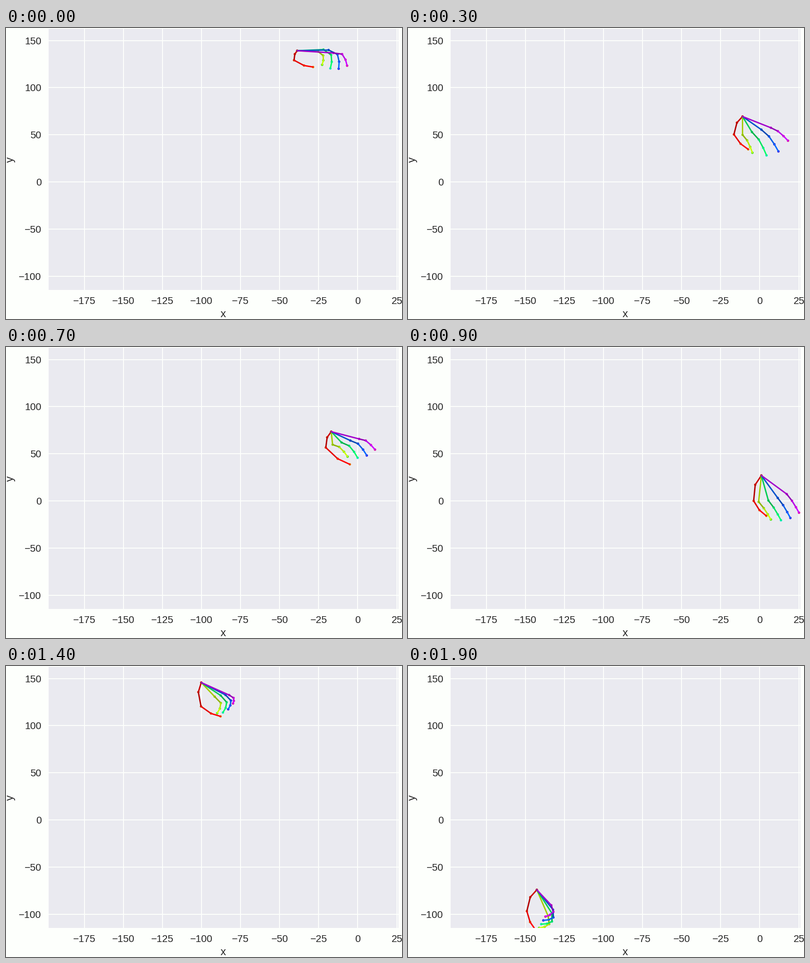
A matplotlib script that plays this animation: 873x641 px, repeating every 2000 ms.

```python
import colorsys

import matplotlib.pyplot as plt
import numpy as np
from matplotlib.animation import FuncAnimation
from matplotlib.collections import LineCollection

W, H, DPI = 873, 641, 144
FRAMES, INTERVAL = 20, 100
LEFT, RIGHT, TOP, BOTTOM = 93.5, 865.5, 2, 577
INK, PAPER, PANEL = "#262626", "#FDFFFC", "#EAEAF0"

plt.rcParams["font.family"] = "Liberation Sans"


def to_data(px):
    """Stage pixels (y down) to axis units."""
    return np.column_stack([(px[:, 0] - 775.5) / 3.4457,
                            (339.2 - px[:, 1]) / 2.0775])


def along(a, b, u, bow=0):
    """Point at fraction u from a to b, pushed sideways by bow * length."""
    v = b - a
    return a + v * u + bow * np.array([-v[1], v[0]])


def hand(wrist, thumb, knuckles, tips, curl, knuckle_bow=0, tip_bow=0):
    """Rig a hand: the four fingers fan out between index and little finger.

    thumb holds its base and tip; knuckles and tips hold the index and
    little finger ends; curl bends each finger outward.
    """
    wrist = np.array(wrist, float)
    (base, end), (k0, k1), (t0, t1) = np.array([thumb, knuckles, tips], float)
    points = [wrist, along(wrist, base, 0.4, 0.12), base,
              along(base, end, 0.55, 0.08), end]
    for u in np.linspace(0, 1, 4):
        arch = 4 * u * (1 - u)
        knuckle = along(k0, k1, u, knuckle_bow * arch)
        tip = along(t0, t1, u, tip_bow * arch)
        points += [knuckle, along(knuckle, tip, 0.38, -curl),
                   along(knuckle, tip, 0.72, -0.65 * curl), tip]
    return np.array(points)


raised = hand((642, 50), [(635, 71), (677, 86)], [(688, 52), (722, 55)],
              [(697, 81), (752, 83)], 0.27, -0.18, 0.15)
lowered = hand((765, 230), [(742, 278), (758, 308)], [(761, 284), (826, 266)],
               [(777, 332), (862, 302)], 0.03, 0, 0.22)
tilted = hand((655, 90), [(648, 104), (726, 145)], [(667, 89), (722, 81)],
              [(706, 103), (765, 87)], 0.23, -0.08, 0.17)
dropped = hand((779, 283), [(762, 339), (790, 372)], [(773, 341), (835, 324)],
               [(800, 380), (862, 365)], 0.03, 0.05, 0.12)
spread = hand((703, 120), [(692, 177), (763, 180)], [(711, 132), (775, 128)],
              [(742, 155), (808, 131)], 0.22, -0.05, 0.2)
across = hand((158, 133), [(168, 181), (183, 222)], [(209, 183), (209, 180)],
              [(189, 233), (193, 214)], 0.36, 2, -0.13)
resting = hand((284, 493), [(262, 540), (281, 581)], [(309, 551), (316, 527)],
               [(289, 577), (303, 552)], 0.38, 0.28)


def smooth(t):
    return (1 - np.cos(np.pi * t)) / 2


def fall(t):
    return t ** 1.5


# Start step, end step, poses, easing, height of the arc in pixels.
MOVES = [
    (0, 2, raised, lowered, smooth, 0),
    (2, 5, lowered, tilted, smooth, 0),
    (5, 9, tilted, dropped, smooth, 0),
    (9, 12, dropped, spread, smooth, 0),
    (12, 16, spread, across, smooth, 90),
    (16, 19, across, resting, fall, 0),
]
LOST_STEP, LOST_JOINTS = 5, [0, 1]  # joints not tracked at this step

BONES = [(0 if j == 0 else 4 * f + j, 4 * f + j + 1)
         for f in range(5) for j in range(4)]
BONE_COLORS = [colorsys.hsv_to_rgb(f / 5, 1, v)
               for f in range(5) for v in (0.8, 0.7, 0.9, 1.0)]
JOINT_COLORS = [(0.8, 0, 0)] + [
    colorsys.hsv_to_rgb(f / 5 + j / 40, 0.9, 0.88)
    for f in range(5) for j in range(1, 5)]


def hand_at(step):
    start, end, a, b, ease, lift = next(m for m in MOVES if step <= m[1])
    t = (step - start) / (end - start)
    pts = a + (b - a) * ease(t)
    pts[:, 1] -= lift * np.sin(np.pi * t)
    if step == LOST_STEP:
        pts[LOST_JOINTS] = np.nan
    return to_data(pts)


fig = plt.figure(figsize=(W / DPI, H / DPI), dpi=DPI, facecolor=PAPER)
ax = fig.add_axes([LEFT / W, 1 - BOTTOM / H,
                   (RIGHT - LEFT) / W, (BOTTOM - TOP) / H],
                  facecolor=PANEL)
(x0, y0), (x1, y1) = to_data(np.array([(LEFT, BOTTOM), (RIGHT, TOP)]))
ax.set(xlim=(x0, x1), ylim=(y0, y1),
       xticks=range(-175, 26, 25), yticks=range(-100, 151, 50))
ax.set_axisbelow(True)
ax.grid(color=PAPER, linewidth=1)
ax.tick_params(length=0, pad=7.75, labelsize=11, labelcolor=INK)
ax.spines[:].set_visible(False)

fig.text(479 / W, 1 - 637 / H, "x", size=12, color=INK,
         ha="center", va="baseline")
fig.text(15.5 / W, 1 - 290 / H, "y", size=12, color=INK, rotation=90,
         rotation_mode="anchor", ha="center", va="baseline")

joints = ax.scatter(np.zeros(21), np.zeros(21), s=7.5, c=JOINT_COLORS,
                    linewidths=0, zorder=3)
bones = LineCollection([], colors=BONE_COLORS, linewidths=1.5,
                       capstyle="round", zorder=4)
ax.add_collection(bones, autolim=False)


def draw(step):
    pts = hand_at(step)
    joints.set_offsets(np.ma.masked_invalid(pts))
    bones.set_segments([pts[[a, b]] for a, b in BONES])
    return joints, bones


anim = FuncAnimation(fig, draw, frames=FRAMES, interval=INTERVAL,
                     init_func=lambda: draw(0), repeat=True, repeat_delay=0)
plt.show()
```
